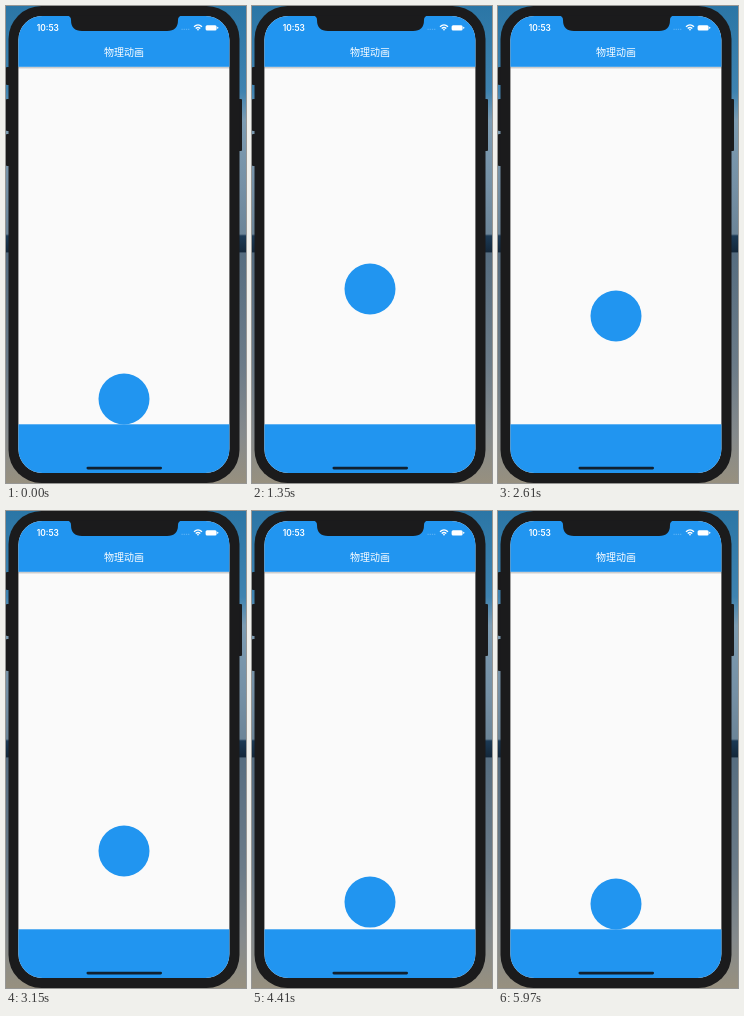
An HTML page that plays this animation: 240 by 477 pixels, repeating every 6000 ms.

```html
<!DOCTYPE html>
<html lang="zh-CN">
<head>
<meta charset="utf-8">
<title>物理动画</title>
<style>
  html, body { margin: 0; width: 100%; height: 100%; overflow: hidden; }
  svg { display: block; width: 100%; height: 100%; }
  .clock { font: 600 8.4px Inter, "Liberation Sans", sans-serif; }
  .title { font: 500 10px "Noto Sans CJK SC", "Noto Sans CJK", sans-serif; }
</style>
</head>
<body>
<svg viewBox="0 0 240 477" preserveAspectRatio="none">
  <defs>
    <linearGradient id="scene" x2="0" y2="1">
      <stop offset="0" stop-color="#2b76a6"/>
      <stop offset=".18" stop-color="#3f83b0"/>
      <stop offset=".24" stop-color="#7d9cb2"/>
      <stop offset=".38" stop-color="#7590a5"/>
      <stop offset=".478" stop-color="#6c8598"/>
      <stop offset=".482" stop-color="#1c3a55"/>
      <stop offset=".515" stop-color="#14283b"/>
      <stop offset=".518" stop-color="#566d80"/>
      <stop offset=".75" stop-color="#6b7b88"/>
      <stop offset=".9" stop-color="#858a8c"/>
      <stop offset="1" stop-color="#97907f"/>
    </linearGradient>
    <linearGradient id="shade" x2="0" y2="1">
      <stop offset="0" stop-color="#000" stop-opacity=".25"/>
      <stop offset="1" stop-color="#000" stop-opacity="0"/>
    </linearGradient>
    <clipPath id="screen"><rect x="12.4" y="10" width="211" height="457" rx="24"/></clipPath>
  </defs>

  <rect width="240" height="477" fill="url(#scene)"/>
  <g fill="#1b1b1c">
    <rect x="0" y="61" width="5" height="18" rx="1"/>
    <rect x="0" y="93" width="5" height="32" rx="1"/>
    <rect x="0" y="128" width="5" height="32" rx="1"/>
    <rect x="231" y="93" width="5" height="52" rx="1"/>
    <rect x="2.5" y="0" width="231" height="477" rx="33"/>
  </g>

  <g clip-path="url(#screen)">
    <rect x="12" y="10" width="212" height="458" fill="#fafafa"/>
    <rect x="12" y="418.3" width="212" height="50" fill="#2195f0"/>
    <circle id="ball" cx="118" cy="393" r="25.5" fill="#2195f0"/>
    <rect x="12" y="60.8" width="212" height="2.6" fill="url(#shade)"/>
    <rect x="12" y="10" width="212" height="50.8" fill="#2195f0"/>
  </g>
  <path d="M61 9.5Q65 10 65 14Q65 25 76 25H161Q172 25 172 14Q172 10 176 9.5Z" fill="#1b1b1c"/>

  <g fill="#fff">
    <text class="clock" x="41.8" y="24.6" text-anchor="middle">10:53</text>
    <text class="title" x="118" y="50.2" text-anchor="middle">物理动画</text>
    <path d="M175.5 23.3h8" stroke="#fff" stroke-opacity=".3" stroke-dasharray="1.2 1"/>
    <path d="M188 20.7Q192 17 196 20.7M189.7 22.5Q192 20.4 194.3 22.5" fill="none" stroke="#fff" stroke-width="1.3"/>
    <path d="M190.8 23.4Q192 22.5 193.2 23.4L192 24.8Z"/>
    <rect x="199.6" y="19.2" width="11" height="5.2" rx="1.5"/>
    <rect x="211.2" y="20.8" width="1" height="2" rx=".5"/>
  </g>
  <rect x="80.5" y="460.8" width="75.5" height="2.6" rx="1.3" fill="#10202f"/>
</svg>

<script>
  const LOOP = 6000, STEP = 30;
  const FLOOR_Y = 393, HALF_GRAVITY = 748.1;
  const FIRST_FLIGHT = 1.2584, FIRST_LANDING = 1.157;
  const RESTITUTION = 0.7707, LOSS = 0.015;
  const ball = document.getElementById("ball");

  const arc = (elapsed, flight) => HALF_GRAVITY * elapsed * (flight - elapsed);

  function bounceHeight(time) {
    let start = FIRST_LANDING - FIRST_FLIGHT;
    let flight = FIRST_FLIGHT;
    while (flight > 0.02) {
      if (time < start + flight) return arc(time - start, flight);
      start += flight;
      flight = flight * RESTITUTION - LOSS;
    }
    return 0;
  }

  // The launch stalls briefly before the bouncing carries on.
  function heightAt(ms) {
    if (ms < 60) return 0;
    if (ms < 420) return arc((Math.min(ms, 150) - 30) / 1000, FIRST_FLIGHT);
    return bounceHeight(ms / 1000);
  }

  function render(ms) {
    const time = Math.floor((ms % LOOP) / STEP) * STEP;
    ball.setAttribute("cy", (FLOOR_Y - heightAt(time)).toFixed(2));
  }

  const origin = performance.now();
  function tick() {
    render(performance.now() - origin);
    requestAnimationFrame(tick);
  }
  tick();
</script>
</body>
</html>
```
